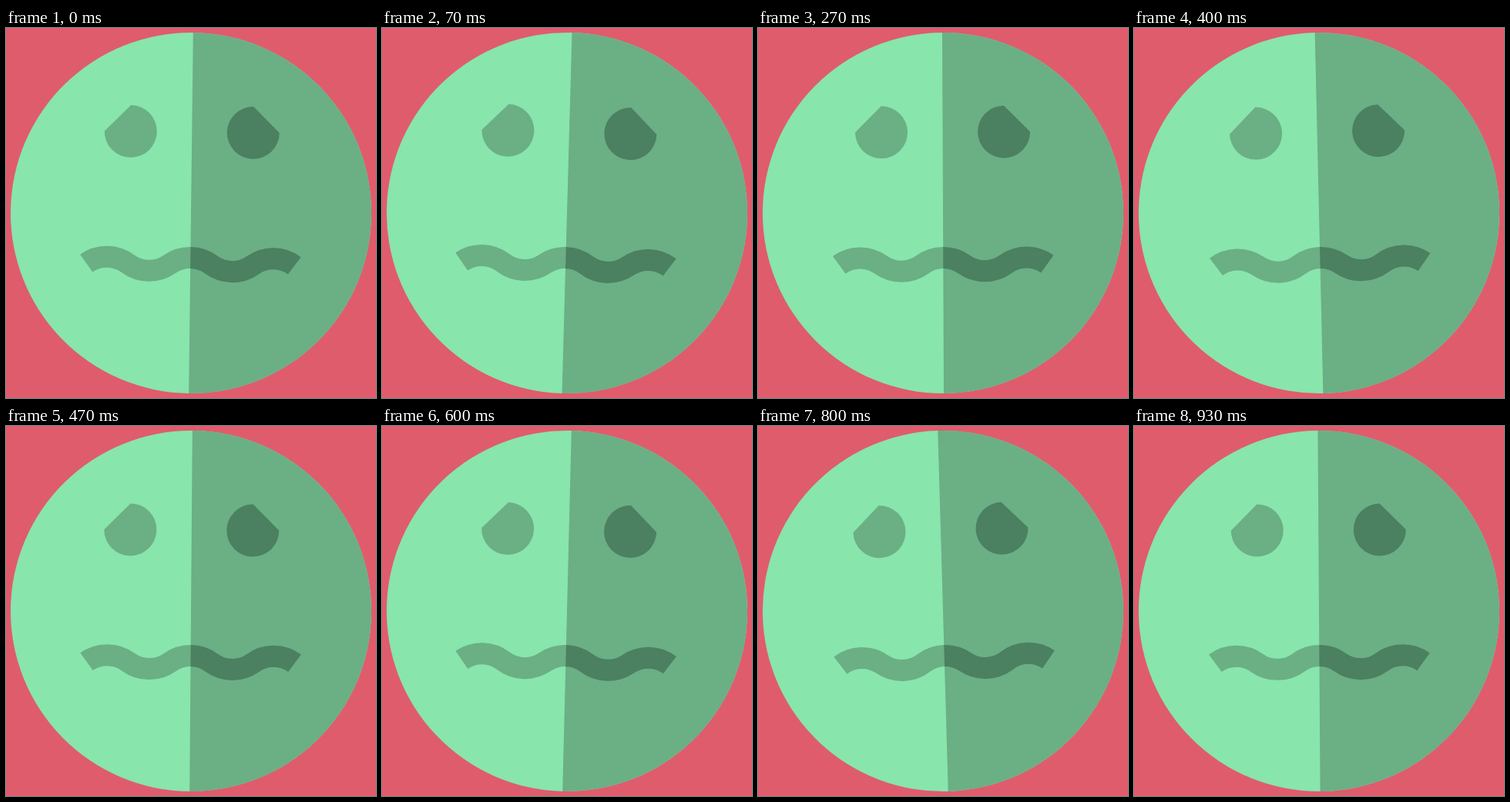
Animation, 480 px wide and 480 px high, one loop 990 ms. Source, as an HTML page with a canvas:

```html
<!DOCTYPE html>
<html lang="en">
<head>
<meta charset="utf-8">
<title>Queasy face</title>
<style>
  html, body { margin: 0; width: 100%; height: 100%; overflow: hidden; background: #df5c6d; }
  canvas { display: block; width: 480px; height: 480px; }
</style>
</head>
<body>
<canvas id="stage" width="480" height="480"></canvas>
<script>
const ctx = document.getElementById('stage').getContext('2d');
const BACK = '#df5c6d', LIGHT = '#88e5ab', MID = '#6baf85', DARK = '#4b8061';
const SIZE = 480, CENTER = 240, LOOP = 990, STEPS = 15;

// Turning points of the wobble: [step, degrees]
const swings = [[-3.1, -1.65], [2.15, 2], [5.4, -1.7], [8.2, 1.8], [11.9, -1.65], [17.15, 2]];

function tilt(step) {
  const i = swings.findIndex(([at]) => at > step);
  const [start, from] = swings[i - 1];
  const [end, to] = swings[i];
  const ease = (1 - Math.cos(Math.PI * (step - start) / (end - start))) / 2;
  return (from + (to - from) * ease) * Math.PI / 180;
}

function stepAt(time) {
  let step = STEPS - 1;
  while (Math.round(step * 100 / STEPS) * 10 > time) step--;
  return step;
}

// A round eye whose upper outer quarter is cut straight; side is -1 or 1
function eye(side) {
  const x = CENTER + side * 79.5, y = 135, r = 34;
  ctx.beginPath();
  ctx.arc(x, y, r, -Math.PI / 2, side < 0 ? Math.PI : 0, side > 0);
  ctx.fill();
}

// A wave of five equal circular arcs
function mouth() {
  const radius = 46, half = 27, middle = 306.75;
  const spread = Math.asin(half / radius);
  const offset = radius * Math.cos(spread);
  ctx.beginPath();
  for (let i = -2; i <= 2; i++) {
    const crest = i % 2 === 0;
    const dir = crest ? 1 : -1;
    const mid = -dir * Math.PI / 2;
    ctx.arc(CENTER + i * 2 * half, middle + dir * offset, radius,
      mid - dir * spread, mid + dir * spread, !crest);
  }
  ctx.lineWidth = 28;
  ctx.stroke();
}

function face(skin, feature) {
  ctx.fillStyle = skin;
  ctx.beginPath();
  ctx.arc(CENTER, CENTER, 234, 0, Math.PI * 2);
  ctx.fill();
  ctx.fillStyle = ctx.strokeStyle = feature;
  eye(-1);
  eye(1);
  mouth();
}

function draw(now) {
  ctx.fillStyle = BACK;
  ctx.fillRect(0, 0, SIZE, SIZE);
  ctx.save();
  ctx.translate(CENTER, CENTER);
  ctx.rotate(tilt(stepAt(now % LOOP)));
  ctx.translate(-CENTER, -CENTER);
  face(LIGHT, MID);
  ctx.beginPath();
  ctx.rect(CENTER, -20, SIZE, SIZE + 40);
  ctx.clip();
  face(MID, DARK);
  ctx.restore();
}

const began = performance.now();
function tick() {
  draw(performance.now() - began);
  requestAnimationFrame(tick);
}
tick();
</script>
</body>
</html>
```
